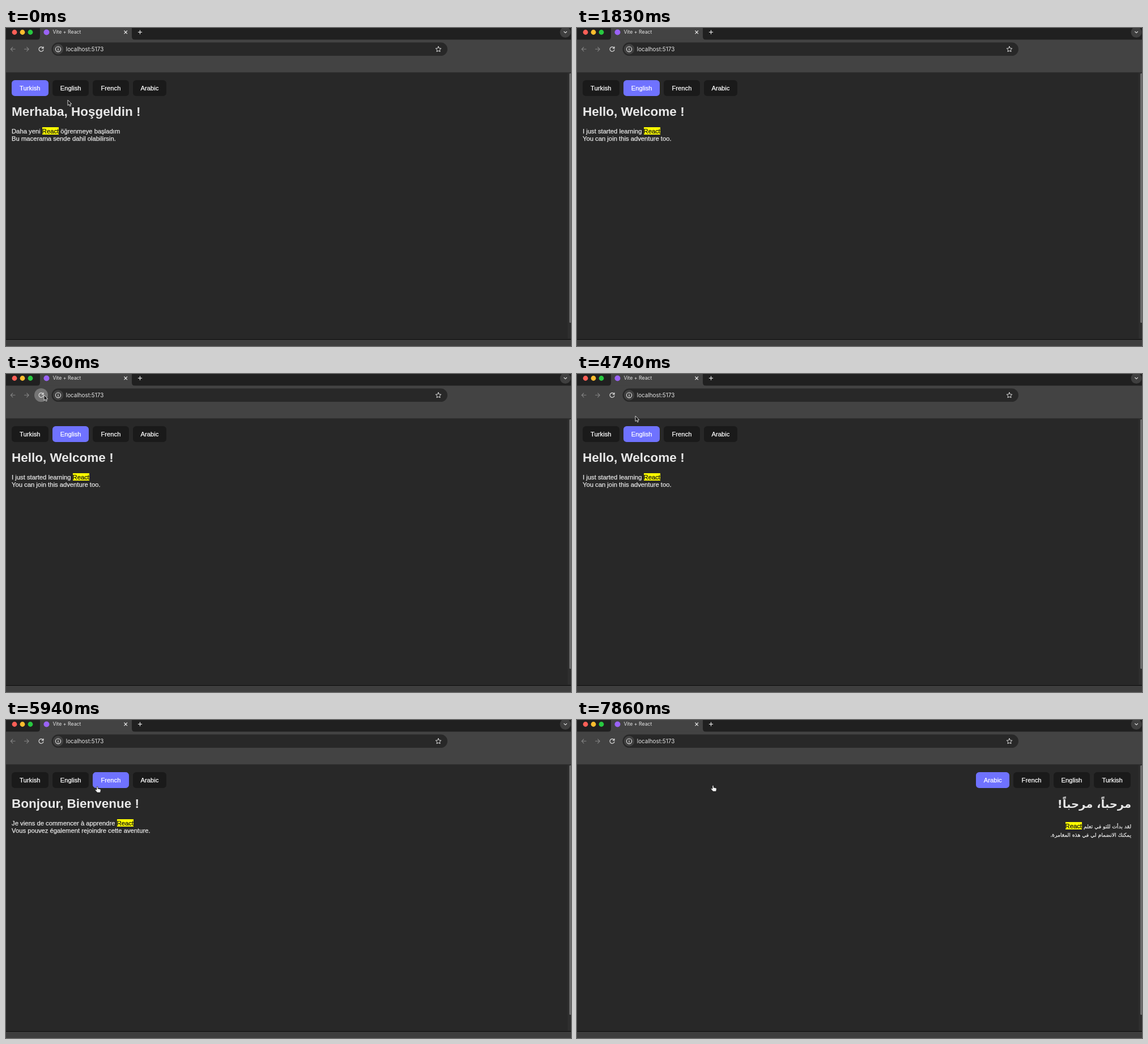
These frames come from a looping animation (997x561 px, 8940 ms). An HTML page:

```html
<!DOCTYPE html>
<html lang="en">
<head>
<meta charset="utf-8">
<title>Language switcher</title>
<style>
  html, body { margin: 0; width: 100%; height: 100%; overflow: hidden; background: #282828; }
  body { position: relative; font: 11.25px/12.9px "Liberation Sans", Arial, sans-serif; color: #e8e8e8; }
  svg { position: absolute; left: 0; top: 0; }
  svg text { font-family: Inter, sans-serif; fill: #e6e6e6; }
  .btn, p { -webkit-text-stroke: .25px; }
  .btn {
    position: absolute; top: 91.8px; height: 27.8px; box-sizing: border-box;
    border: 1px solid transparent; border-radius: 5.6px;
    line-height: 26px; text-align: center; color: #fff; background: #1a1a1a;
  }
  .btn.on { background: #6f72ff; }
  #page > * { position: absolute; left: 10px; margin: 0; white-space: nowrap; }
  h1 { top: 135.8px; font-size: 22.5px; line-height: 24.75px; }
  p { top: 175.6px; }
  mark { background: #ff0; color: #111; padding: .5px 0; }
  #page.rtl { direction: rtl; }
  #page.rtl > * { left: auto; right: 19px; }
  .rtl h1 { top: 136.5px; font-size: 19.5px; font-family: "DejaVu Sans", sans-serif; }
  .rtl p { top: 179.8px; line-height: 15px; }
  .rtl span { font: 9.2px/0 "DejaVu Sans", sans-serif; }
</style>
</head>
<body>
<svg width="997" height="561" viewBox="0 0 997 561" fill="none" stroke-linecap="round" stroke-linejoin="round">
  <rect width="997" height="21" fill="#202020"/>
  <path d="M54 21Q60 21 60 15V0H222V15Q222 21 228 21Z" fill="#434343"/>
  <rect y="20.5" width="997" height="57.5" fill="#434343"/>
  <rect y="78" width="997" height="1" fill="#303030"/>
  <circle cx="15" cy="7.5" r="4.4" fill="#ff5f57"/>
  <circle cx="29" cy="7.5" r="4.4" fill="#febc2e"/>
  <circle cx="43" cy="7.5" r="4.4" fill="#28c840"/>
  <circle id="icon" cx="71.5" cy="7.5" r="5" fill="#9a63f6"/>
  <text x="82.5" y="10.4" font-size="8.7">Vite + React</text>
  <circle cx="987" cy="7.5" r="9.5" fill="#3f3f3f"/>
  <g stroke="#e0e0e0" stroke-width="1.2">
    <path d="M208.8 5l4.8 4.8M213.6 5l-4.8 4.8M233.4 7.3h6.2M236.5 4.2v6.2M984.7 6.3l2.4 2.4 2.4-2.4"/>
  </g>
  <path d="M16 37.3H8.3M11.8 33.8L8.3 37.3l3.5 3.5M32.5 37.3h7.7M36.7 33.8l3.5 3.5-3.5 3.5" stroke="#858585" stroke-width="1.1"/>
  <circle id="ripple" cx="62" cy="37.3" r="12" fill="#757575"/>
  <path d="M65.6 35.6A4 4 0 1 0 65.9 38.3M66 33.2v2.7h-2.8" stroke="#dedede" stroke-width="1.2"/>
  <rect x="80.5" y="25.5" width="698.5" height="23.6" rx="11.8" fill="#282828"/>
  <circle cx="92" cy="37.3" r="9.2" fill="#404040"/>
  <circle cx="92" cy="37.3" r="4.6" stroke="#e4e4e4" stroke-width="1.1"/>
  <path d="M92 37v2.3M92 35v.1" stroke="#e4e4e4" stroke-width="1.2"/>
  <text x="105.8" y="40.8" font-size="9.9">localhost:5173</text>
  <path d="M763 32.6l1.4 3.1 3.4.4-2.5 2.3.7 3.4-3-1.7-3 1.7.7-3.4-2.5-2.3 3.4-.4z" stroke="#e0e0e0"/>
  <rect x="991" y="79" width="6" height="469" fill="#2e2e2e"/>
  <rect x="994" y="80" width="4" height="440" rx="1.5" fill="#6c6c6c"/>
  <rect y="549" width="997" height="1" fill="#0c0c0c"/>
  <rect y="550" width="997" height="11" fill="#3e3e3e"/>
</svg>
<div id="bar"></div>
<div id="page"></div>
<svg width="997" height="561" viewBox="0 0 997 561" stroke-linejoin="round">
  <g id="cursor">
    <path id="arrow" d="M0 0V9.6L2.2 7.6 3.7 11 5.3 10.3 3.9 7H6.8Z" fill="#161616" stroke="#e4e4e4" stroke-width=".9"/>
    <path id="hand" d="M-1.1 1.4a1.1 1.1 0 0 1 2.2 0V4l4 .9q1.3.3 1.2 1.6L5.6 11H.2L-3.3 7.2q-.8-1.2.3-1.6.9-.3 1.9.8z" fill="#f4f4f4" stroke="#111" stroke-width=".7"/>
  </g>
</svg>
<script>
const LOOP = 8940;
const $ = id => document.getElementById(id);

const buttons = [
  ["Turkish", 10, 64.7], ["English", 81.8, 64.7],
  ["French", 153.2, 63.4], ["Arabic", 223.5, 59.8],
];
// title, text before and after the highlight, second line
const texts = [
  ["Merhaba, Hoşgeldin !", "Daha yeni ", " öğrenmeye başladım", "Bu macerama sende dahil olabilirsin."],
  ["Hello, Welcome !", "I just started learning ", "", "You can join this adventure too."],
  ["Bonjour, Bienvenue !", "Je viens de commencer à apprendre ", "", "Vous pouvez également rejoindre cette aventure."],
  ["مرحباً، مرحباً!", "لقد بدأت للتو في تعلم ", "", "يمكنك الانضمام لي في هذه المغامرة."],
];
const clicks = [[0, 0], [1080, 1], [5580, 2], [7110, 3]];  // time, language
const hovers = [[480, 1700, 1], [4840, 5200, 1], [5270, 6250, 2], [6440, 7110, 3]];  // in, out, button
const reloads = [[2820, 2910], [3360, 3450], [3720, 3930]];
const path = [
  [0, 109, 127], [240, 109, 127], [840, 112, 114], [1620, 112, 114], [1830, 110, 76],
  [2190, 106, 70], [2640, 67, 37], [4230, 67, 37], [4740, 103, 74], [5400, 161, 117],
  [6030, 161, 117], [6690, 240, 115], [LOOP, 240, 115],
];

const els = buttons.map(([name]) => {
  const el = document.createElement("div");
  el.className = "btn";
  el.textContent = name;
  $("bar").append(el);
  return el;
});

const clamp = v => Math.max(0, Math.min(1, v));
const within = (t, [a, b]) => t >= a && t < b;

function cursorAt(t) {
  const i = path.findIndex(p => p[0] > t);
  const [t0, x0, y0] = path[i - 1], [t1, x1, y1] = path[i];
  const k = (t - t0) / (t1 - t0), e = k * k * (3 - 2 * k);
  return [x0 + (x1 - x0) * e, y0 + (y1 - y0) * e];
}

let shown = -1;
function setLanguage(lang) {
  if (lang === shown) return;
  shown = lang;
  const rtl = lang === 3;
  const [title, before, after, second] = texts[lang];
  $("page").className = rtl ? "rtl" : "";
  $("page").innerHTML = `<h1>${title}</h1><p><span>${before}</span><mark>React</mark>` +
    `<span>${after}</span><br><span>${second}</span></p>`;
  els.forEach((el, i) => {
    const [, x, w] = buttons[i];
    el.style.left = (rtl ? 987 - x - w : x) + "px";
    el.style.width = w + "px";
    el.classList.toggle("on", i === lang);
  });
}

function draw(t) {
  setLanguage(clicks.filter(c => c[0] <= t).pop()[1]);

  els.forEach((el, i) => {
    let glow = 0;
    for (const [start, end, b] of hovers)
      if (b === i) glow = Math.max(glow, clamp((t - start) / 250) - clamp((t - end) / 250));
    el.style.borderColor = `rgba(111,114,255,${glow})`;
  });

  const [x, y] = cursorAt(t);
  const hand = y > 91 && (hovers.some(h => within(t, h)) || t >= 7110);
  $("cursor").setAttribute("transform", `translate(${x} ${y})`);
  $("cursor").style.display = within(t, [1830, 2190]) ? "none" : "";
  $("hand").style.display = hand ? "" : "none";
  $("arrow").style.display = hand ? "none" : "";

  $("ripple").style.opacity = clamp((t - 2520) / 120) - clamp((t - 4290) / 150);
  $("icon").style.opacity = reloads.some(([a, b]) => within(t, [a + 60, b])) ? 0 : 1;
}

function tick() {
  draw(performance.now() % LOOP);
  requestAnimationFrame(tick);
}
tick();
</script>
</body>
</html>
```
